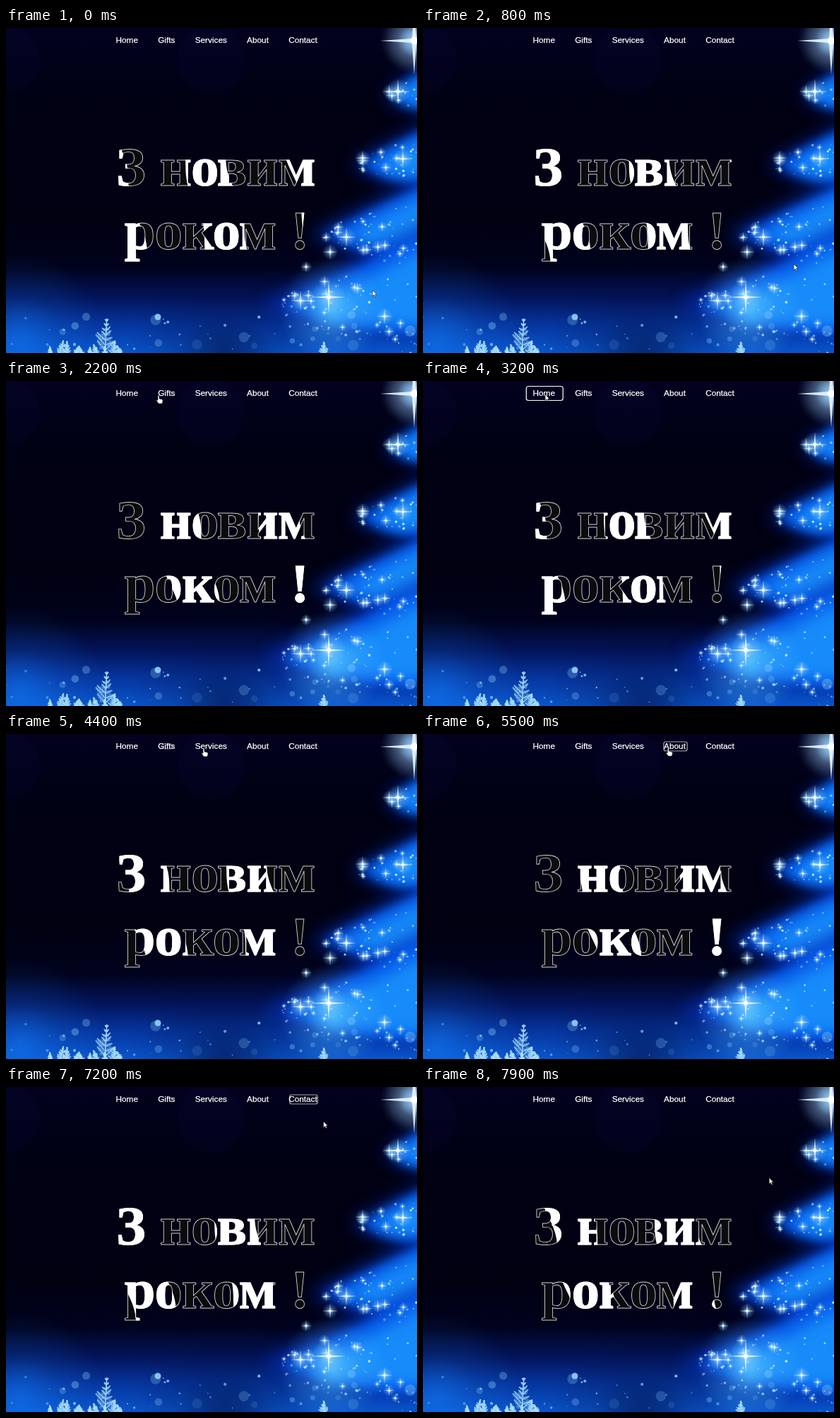
Write an HTML page with a canvas that moves like this. It is 582 px wide and 460 px high and loops after 8 s.

```html
<!DOCTYPE html>
<html lang="uk">
<head>
<meta charset="utf-8">
<style>
html, body { margin: 0; width: 100%; height: 100%; overflow: hidden; background: #010112; }
canvas, svg { position: absolute; left: 0; top: 0; width: 582px; height: 460px; }
.nav { font: 11.8px "Liberation Sans", Arial, sans-serif; }
.title { font: bold 79px "Liberation Serif", "Times New Roman", serif; letter-spacing: -1px; word-spacing: 2px; }
</style>
</head>
<body>
<canvas id="sky" width="582" height="460"></canvas>
<svg viewBox="0 0 582 460">
  <defs>
    <g id="title" class="title">
      <text x="156" y="223">З новим</text>
      <text x="167.5" y="313">роком !</text>
    </g>
    <clipPath id="bands"><path id="band"/></clipPath>
  </defs>
  <use href="#title" fill="#0b0b0d" stroke="#d4d4da" stroke-width=".9"/>
  <g clip-path="url(#bands)"><use href="#title" fill="#fff" stroke="#fff" stroke-width=".9"/></g>
  <g id="nav" class="nav"></g>
  <g id="cursor" fill="#fff" stroke="#111" stroke-width=".6">
    <path id="arrow" d="M0 0V8.6L2 6.8 3.4 9.8 4.8 9.1 3.4 6.2H6Z"/>
    <path id="hand" d="M-2 0Q-1-1.4 0 0V4L4 5Q5.4 5.6 5 8L4 11H-1L-4 6.6Q-3.6 5-2 6.4Z"/>
  </g>
</svg>
<script>
const $ = id => document.getElementById(id);
const W = 582, H = 460, LOOP = 8000, STEP = 100;
const c = $('sky').getContext('2d');

let seed = 11;
const rand = () => (seed = seed * 16807 % 2147483647) / 2147483647;
const range = (a, b) => a + (b - a) * rand();
const smooth = v => v * v * (3 - 2 * v);

function glow(x, y, r, rgb, alpha) {
  const g = c.createRadialGradient(x, y, 0, x, y, r);
  g.addColorStop(0, `rgba(${rgb},${alpha})`);
  g.addColorStop(0.5, `rgba(${rgb},${alpha * 0.3})`);
  g.addColorStop(1, `rgba(${rgb},0)`);
  c.fillStyle = g;
  c.fillRect(x - r, y - r, 2 * r, 2 * r);
}

function dot(x, y, r, alpha, rgb = '150,215,255') {
  c.fillStyle = `rgba(${rgb},${alpha})`;
  c.beginPath();
  c.arc(x, y, r, 0, 7);
  c.fill();
}

function star(x, y, r) {
  glow(x, y, r, '150,215,255', 0.9);
  c.fillStyle = 'rgba(235,247,255,.9)';
  c.beginPath();
  for (let i = 0; i < 8; i++) {
    const a = i * Math.PI / 4, d = i % 2 ? r * 0.09 : r;
    c.lineTo(x + Math.cos(a) * d, y + Math.sin(a) * d);
  }
  c.fill();
  dot(x, y, 0.6 + r * 0.1, 1, '255,255,255');
}

// The tree is a stack of tiers that widen downwards
const tiers = [0, 1, 2, 3].map(i => ({
  top: 58 + 88 * i - 4 * i * i,
  tipX: 542 - 38 * i - 5 * i * i,
  tipY: 92 + 100 * i,
  bottom: 112 + 106 * i
}));

function paintTier({ top, tipX, tipY, bottom }, size, color, blur) {
  c.save();
  c.filter = `blur(${blur}px)`;
  c.translate(W + 20, tipY);
  c.scale(size, size);
  c.translate(-W - 20, -tipY);
  c.fillStyle = color;
  c.beginPath();
  c.moveTo(W + 40, top - 14);
  c.quadraticCurveTo((tipX + W) / 2, (top + tipY) / 2, tipX, tipY);
  c.quadraticCurveTo((tipX + W) / 2, bottom + 10, W + 40, bottom);
  c.fill();
  c.restore();
}

function sparkle({ top, tipX, tipY, bottom }, count) {
  for (let i = 0; i < count; i++) {
    const f = rand(), x = tipX + (W - tipX) * f;
    const y = tipY + range(-0.5, 0.5) * (bottom - top) * (0.2 + f * 0.8);
    if (i % 6) dot(x, y, range(0.4, 1.9), range(0.4, 1), '200,235,255');
    else star(x, y, range(4, 10));
  }
}

function twig(x, y, len, angle, depth) {
  const dx = Math.cos(angle) * len, dy = Math.sin(angle) * len;
  c.lineWidth = 0.6 + depth * 0.6;
  c.beginPath();
  c.moveTo(x, y);
  c.lineTo(x + dx, y + dy);
  c.stroke();
  if (!depth) return;
  for (let f = 0.15; f < 1; f += 0.13)
    for (const s of [-1, 1])
      twig(x + dx * f, y + dy * f, len * 0.4 * (1.1 - f) * range(0.7, 1.2), angle + s * range(0.7, 1.1), depth - 1);
}

function drawSky() {
  const g = c.createLinearGradient(0, 0, 0, H);
  [[0, '#02021f'], [0.2, '#010114'], [0.6, '#010112'], [0.74, '#01031e'],
   [0.83, '#03145a'], [0.91, '#06349c'], [1, '#0a55cc']].forEach(s => g.addColorStop(...s));
  c.fillStyle = g;
  c.fillRect(0, 0, W, H);
  glow(20, 440, 120, '20,130,255', 0.5);
  glow(310, 470, 140, '1,8,50', 0.6);
  for (const x of [0, 290]) dot(x, 45, 48, 0.1, '10,10,100');

  for (const t of tiers) {
    paintTier(t, 1.08, 'rgba(4,50,190,.8)', 12);
    paintTier(t, 0.95, 'rgba(8,100,245,.85)', 7);
    paintTier(t, 0.75, 'rgba(30,155,255,.75)', 10);
  }
  glow(462, 400, 75, '90,200,255', 0.8);

  for (let i = 0; i < 45; i++) dot(range(0, W), range(408, 458), range(0.5, 2.2), range(0.3, 0.9));
  for (let i = 0; i < 16; i++) dot(range(0, W), range(405, 450), range(3, 8), range(0.1, 0.35));
  dot(215, 409, 4.5, 0.85);
  tiers.forEach((t, i) => sparkle(t, 18 + 24 * i));

  [[555, 90, 18], [562, 185, 14], [505, 184, 11], [482, 296, 14], [459, 317, 11],
   [457, 381, 24], [417, 386, 14], [536, 408, 12], [425, 338, 8]].forEach(s => star(...s));
  glow(578, 18, 42, '160,185,255', 0.7);
  star(578, 18, 48);

  c.strokeStyle = 'rgba(175,228,255,.85)';
  twig(140, 464, 53, -1.52, 2);
  twig(450, 464, 20, -1.57, 2);
  for (let x = 64; x < 166; x += 11) twig(x, 464, range(12, 24), range(-2.1, -1.1), 2);
}

function svg(name, attrs) {
  const e = document.createElementNS('http://www.w3.org/2000/svg', name);
  set(e, attrs);
  return $('nav').appendChild(e);
}

function set(e, attrs) {
  for (const k in attrs) e.setAttribute(k, attrs[k]);
}

let nextX = 155.5;
const links = ['Home', 'Gifts', 'Services', 'About', 'Contact'].map(label => {
  const text = svg('text', { x: nextX, y: 21, fill: '#fff', stroke: '#fff', 'stroke-width': 0.25 });
  text.textContent = label;
  const w = text.getComputedTextLength(), mid = nextX + w / 2 + 1;
  nextX += w + 28.2;
  const box = svg('rect', { fill: 'none', stroke: '#fff', 'stroke-width': 1.2, rx: 3 });
  return { box, mid, w: w + 20.5 };
});

// Pointer route: time, x, y
const route = [[0, 519, 371], [800, 525, 334], [1900, 240, 70], [2200, 217, 21], [2700, 180, 20],
  [3200, 173, 19], [3600, 185, 19], [4300, 255, 20], [4400, 281, 21], [6150, 388, 20],
  [6500, 433, 19], [7000, 438, 26], [8000, 496, 140]];

function pointer(t) {
  const n = route.findIndex(r => r[0] > t);
  const [t0, x0, y0] = route[n - 1], [t1, x1, y1] = route[n];
  const f = (t - t0) / (t1 - t0);
  return [x0 + (x1 - x0) * f, y0 + (y1 - y0) * f];
}

const hovered = ([x, y], { mid, w }) => y < 29 && Math.abs(x - mid) < w / 2;

// Each box takes five steps to open or close under the pointer
function openness(link, t) {
  let n = 0;
  for (let s = 0; s <= t; s += STEP)
    n = hovered(pointer(s), link) ? Math.min(5, n + 1) : Math.max(0, n - 1);
  return smooth(n / 5);
}

const PERIOD = 148, SPEED = 0.0468;

function bandPath() {
  const edge = (x, y) => `${x + 0.25 * (y - 205) + 4 * Math.sin(y / 17 + x / 60)} ${y} `;
  let d = '';
  for (let x = 257 - 3 * PERIOD; x < W; x += PERIOD) {
    const left = [], right = [];
    for (let y = 150; y <= 340; y += 5) {
      left.push(edge(x, y));
      right.unshift(edge(x + 61, y));
    }
    d += 'M' + left.concat(right).join('L') + 'Z';
  }
  return d;
}

function render(t) {
  set($('band'), { transform: `translate(${t * SPEED % PERIOD} 0)` });

  for (const link of links) {
    const p = openness(link, t), width = link.w * p, height = 20 * p;
    set(link.box, { x: link.mid - width / 2, y: 17.5 - height / 2, width, height, opacity: p < 0.12 ? 0 : p });
  }

  const at = pointer(t), pointing = links.slice(1).some(link => hovered(at, link));
  set($('cursor'), { transform: `translate(${at})` });
  $('hand').style.display = pointing ? '' : 'none';
  $('arrow').style.display = pointing ? 'none' : '';
}

drawSky();
set($('band'), { d: bandPath() });
const begin = performance.now();
(function tick() {
  const t = (performance.now() - begin) % LOOP;
  render(Math.floor(t / STEP) * STEP);
  requestAnimationFrame(tick);
})();
</script>
</body>
</html>
```
